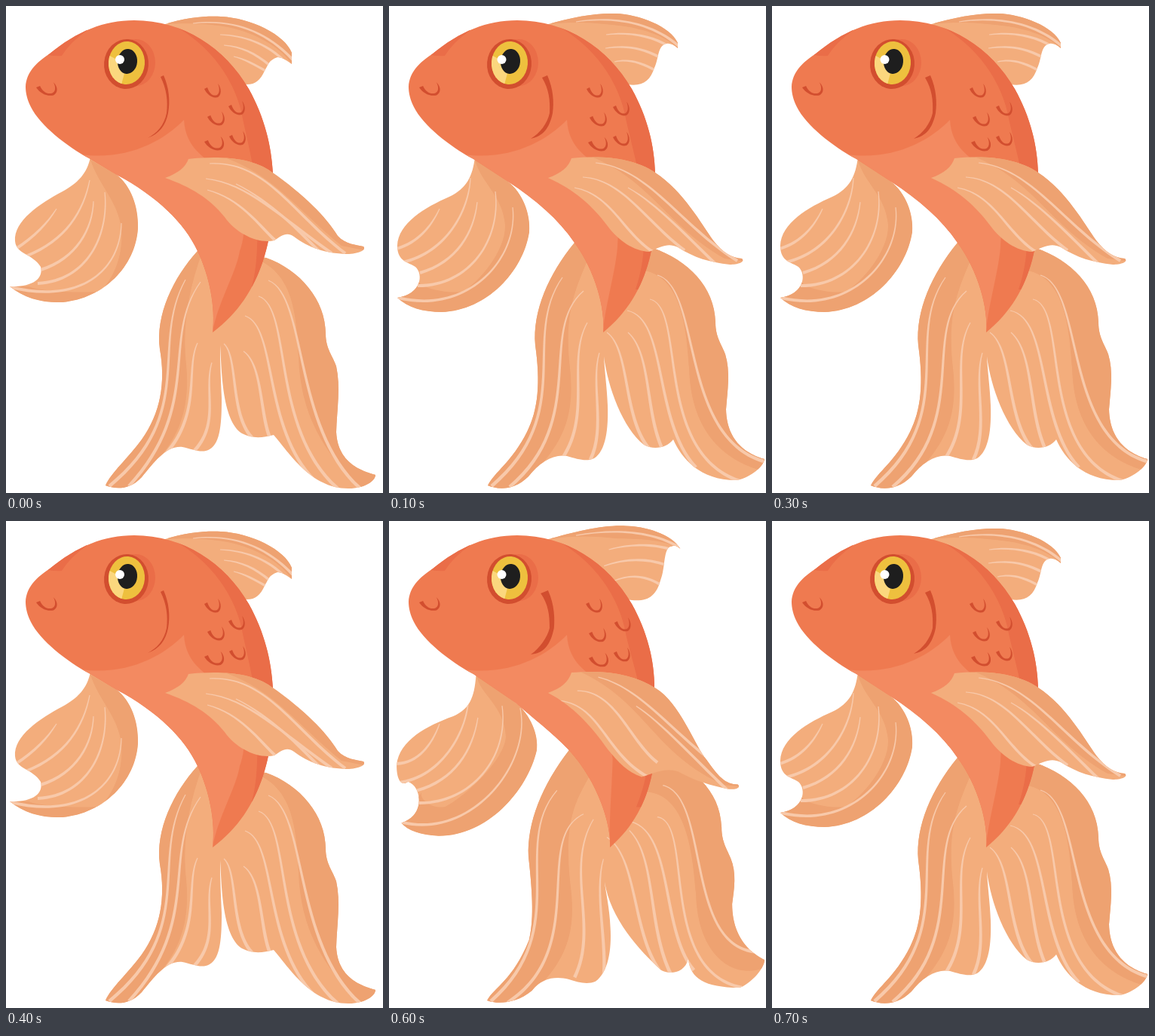
An HTML page with a canvas for the animation above (800 ms loop, 500x646 px).

```html
<!DOCTYPE html>
<html lang="en">
<head>
<meta charset="utf-8">
<title>Goldfish</title>
<style>
html, body { margin: 0; width: 100%; height: 100%; overflow: hidden; background: #fff; }
canvas { display: block; width: 500px; height: 646px; }
</style>
</head>
<body>
<canvas id="stage"></canvas>
<script>
const W = 500, H = 646, STEP = 100;
const SWAY = [0, 1, 1.9, 1]; // one stroke of the fins: rest, middle, far, middle
const FIN = '#f3ad7c', FIN_DARK = '#eea271', RAY = '#f8c9aa';
const SKIN = '#ef7a50', SKIN_DARK = '#ea6d48', BELLY = '#f38a61', RED = '#d24e2f';

// Every shape is a pair: at rest, and one step into the sway.
const dorsal = {
  edge: [
    'M208 25C240 14 270 13 285 14C325 16 370 38 379 62L379 77C372 72 366 68 360 68C348 72 348 78 343 86C337 99 330 105 317 104L260 60Z',
    'M208 25C245 14 275 9 300 10C332 11 373 27 383 49L383 56C377 51 372 49 368 50C356 52 358 70 352 82C346 100 336 107 316 104L260 60Z'],
  dark: [[
    'M215 24C250 22 272 25 288 27C325 33 362 52 379 77L390 60L380 5L210 5Z',
    'M215 24C250 20 275 23 296 25C332 28 364 38 383 56L392 40L380 5L210 5Z']],
  rays: [
    ['M248 23C300 17 345 33 380 71', 'M248 21C300 13 350 23 384 53'],
    ['M284 38C315 39 345 50 366 70', 'M288 38C318 34 350 40 370 53'],
    ['M289 52C312 54 330 62 350 79', 'M287 56C312 52 335 55 359 68'],
    ['M302 67C316 70 330 78 346 87', 'M299 74C318 70 335 75 354 86']]
};

const pelvic = {
  edge: [
    'M112 200C108 222 95 235 75 246C45 262 10 285 12 312C14 330 35 328 46 346C50 362 35 373 5 372C25 388 48 394 75 393C130 388 172 345 175 295C176 265 165 238 147 224Z',
    'M114 200C111 226 103 242 80 253C48 267 12 288 11 318C11 340 27 340 35 346C46 356 43 382 11 387C25 400 45 406 70 406C130 404 178 352 186 300C188 275 177 248 158 233Z'],
  dark: [[
    'M112 204C124 240 148 258 153 295C156 335 140 365 124 379C85 381 45 378 30 372L5 372C25 388 48 394 75 393C130 388 172 345 175 295C176 265 165 238 147 224Z',
    'M114 204C122 235 150 250 154 290C155 325 120 365 98 379C70 382 40 372 38 364L11 387C25 400 45 406 70 406C130 404 178 352 186 300C188 275 177 248 158 233Z']],
  rays: [
    ['M67 269C55 288 38 306 13 322', 'M67 269C56 293 38 314 10 322'],
    ['M111 231C103 272 80 311 26 332', 'M108 228C106 272 76 327 18 340'],
    ['M116 259C115 295 94 335 46 350', 'M117 260C113 300 90 340 41 354'],
    ['M131 247C137 305 107 365 42 368', 'M141 246C149 312 105 372 38 371'],
    ['M153 288C152 350 100 396 6 373', 'M164 267C172 335 105 410 12 387']]
};

const tail = {
  edge: [
    'M254 325C222 360 198 410 204 455C212 500 205 540 180 575C162 600 140 618 132 636C143 640 162 644 180 625C197 605 212 583 234 585C248 588 260 594 270 588C285 580 286 550 286 520C285 495 284 475 284 450C286 480 286 550 313 567C326 574 340 573 355 569C375 592 405 641 455 640C475 640 490 630 490 622C478 618 440 610 438 565C439 535 444 505 438 478C434 465 424 455 424 435C424 390 390 350 345 334Z',
    'M246 314C212 355 190 405 194 450C201 500 198 535 183 565C163 605 140 618 131 636C143 641 165 644 185 624C200 605 218 594 236 597C250 601 262 605 272 600C288 590 291 560 290 530C289 505 286 485 285 465C290 505 310 560 338 582C350 589 368 587 377 575C388 600 412 629 460 629C475 628 497 612 498 601C485 597 448 585 447 535C449 510 453 485 446 462C442 450 433 440 433 420C432 372 396 337 350 321Z'],
  dark: [
    ['M262 322C240 380 234 430 239 475C244 530 232 565 205 598L170 660L100 660L180 300Z',
     'M275 310C250 370 231 400 240 480C246 535 235 570 205 605L170 660L100 660L170 300Z'],
    ['M330 335C385 355 385 420 388 465C390 540 420 590 470 640L500 650L500 320L320 310Z',
     'M320 350C390 345 394 430 398 480C400 560 440 600 490 615L510 600L510 310L320 310Z']],
  rays: [
    ['M238 363C190 450 255 540 137 637', 'M230 360C174 440 250 540 136 637'],
    ['M258 366C205 440 262 530 163 637', 'M258 378C197 430 265 550 160 638'],
    ['M254 447C238 480 260 540 212 594', 'M263 420C235 470 270 540 230 600'],
    ['M273 473C262 510 285 555 248 592', 'M279 460C267 500 288 560 267 602'],
    ['M348 364C400 385 380 560 470 640', 'M356 357C415 375 385 570 497 604'],
    ['M335 385C380 400 350 560 440 640', 'M346 389C395 400 350 590 465 630'],
    ['M317 411C360 425 340 560 410 630', 'M316 404C370 415 350 550 407 612'],
    ['M315 458C340 475 337 540 350 572', 'M317 433C348 460 340 540 363 588'],
    ['M289 448C308 465 297 540 326 572', 'M289 433C320 455 310 545 345 587']]
};

const pectoral = {
  edge: [
    'M211 228C228 222 238 214 242 203C280 199 325 200 352 220C395 250 425 280 440 305C450 316 465 317 474 319C478 323 470 328 455 329C425 329 400 320 382 306C372 299 365 305 356 311C335 316 305 302 290 280C270 255 245 240 211 228Z',
    'M211 228C228 222 238 214 242 202C285 198 325 202 353 221C390 245 415 290 430 311C443 328 455 334 468 335C473 340 462 343 452 343C425 340 405 334 383 320C370 314 362 319 345 326C325 325 305 312 290 292C270 265 245 243 211 228Z'],
  dark: [[
    'M270 195C350 215 385 270 445 318L480 325L480 190Z',
    'M255 195C345 225 365 290 445 335L480 340L480 190Z']],
  rays: [
    ['M270 209C345 205 380 275 450 328', 'M274 208C345 215 385 290 462 338'],
    ['M265 229C320 235 365 280 432 328', 'M257 227C310 230 340 285 392 324'],
    ['M267 244C310 255 335 290 357 311', 'M246 241C295 250 310 300 350 326'],
    ['M305 236C350 258 390 300 415 325', 'M317 241C355 262 400 310 433 342']]
};

const body = [
  'M26 107C27 88 40 75 57 64C95 33 130 19 170 19C235 19 290 55 322 110C343 148 352 185 354 222C358 300 342 383 274 433C278 400 270 358 254 325C237 288 200 252 147 224L112 203C80 186 45 158 33 134C28 124 26 115 26 107Z',
  'M26 107C27 88 40 75 57 64C95 33 130 19 170 19C235 19 290 55 322 110C343 148 352 185 353 222C358 300 350 380 284 433C287 402 274 352 246 314C225 283 195 257 158 233L112 203C80 186 45 158 33 134C28 124 26 115 26 107Z'];
const belly = [
  'M100 197C160 205 208 180 236 151C238 185 258 200 290 220C320 250 320 300 310 325C305 355 280 395 274 433L150 433L60 230Z',
  'M100 197C160 205 208 180 236 151C238 185 258 200 290 220C315 245 304 290 303 320C300 355 286 400 284 433L150 433L60 230Z'];
const back = [
  'M200 15C262 40 300 90 312 140C322 190 335 230 334 290C333 330 332 350 326 372L380 372L380 15Z',
  'M200 15C262 40 300 90 312 140C322 190 338 230 339 300C338 335 334 355 327 376L380 376L380 15Z'];
const gill = [
  'M205 94L209 92C216 108 218 125 215 142C212 158 203 170 188 175C200 169 210 158 213 142C215 126 213 110 205 94Z',
  'M203 95L210 92C218 110 219 128 217 142C213 162 204 173 188 176C200 169 210 156 213 142C214 125 212 110 203 95Z'];
const brow = 'M50 64Q64 67 74 66Q85 48 108 32L60 30Z';
const crescent = new Path2D('M0 1L4-1C7 8 12 11 17 9C20 7 21 1 18-6C23 0 23 9 18 12C11 14 4 9 0 1Z');
// x, y at rest, x, y one step on, width
const scales = [
  [263, 109, 262, 109, 1], [267, 146, 266, 147, 1.05], [295, 132, 297, 133, 1],
  [263, 179, 264, 180, 1.2], [296, 172, 297, 173, 1]
];

const canvas = document.getElementById('stage');
const ctx = canvas.getContext('2d');
const dpr = window.devicePixelRatio || 1;
canvas.width = W * dpr;
canvas.height = H * dpr;

const nums = s => s.match(/-?\d+(\.\d+)?/g).map(Number);
const clamp = (v, lo, hi) => Math.min(hi, Math.max(lo, v));

// Blend a pair; k above 1 swings on, but stays inside the fish's bounds.
function blend([a, b], k) {
  const p = nums(a), q = nums(b);
  return p.map((v, i) => {
    const r = v + (q[i] - v) * k;
    if (k <= 1) return r;
    return i % 2 ? clamp(r, 4, 641) : clamp(r, 10, 498);
  });
}

function shape(pair, k) {
  const v = blend(pair, k);
  let i = 0;
  return new Path2D(pair[0].replace(/-?\d+(\.\d+)?/g, () => v[i++].toFixed(2)));
}

function fill(path, color) {
  ctx.fillStyle = color;
  ctx.fill(path);
}

// A cubic stroke that widens from its root to its end.
function ray(pair, k, width) {
  const [x0, y0, x1, y1, x2, y2, x3, y3] = blend(pair, k);
  const off = (ax, ay, bx, by, w) => {
    const d = Math.hypot(bx - ax, by - ay) || 1;
    return [(ay - by) / d * w, (bx - ax) / d * w];
  };
  const [ax, ay] = off(x0, y0, x1, y1, 0.6);
  const [bx, by] = off(x0, y0, x2, y2, width * 0.36);
  const [cx, cy] = off(x1, y1, x3, y3, width * 0.46);
  const [dx, dy] = off(x2, y2, x3, y3, width * 0.5);
  const p = new Path2D();
  p.moveTo(x0 + ax, y0 + ay);
  p.bezierCurveTo(x1 + bx, y1 + by, x2 + cx, y2 + cy, x3 + dx, y3 + dy);
  p.lineTo(x3 - dx, y3 - dy);
  p.bezierCurveTo(x2 - cx, y2 - cy, x1 - bx, y1 - by, x0 - ax, y0 - ay);
  p.closePath();
  fill(p, RAY);
}

function clipped(path, draw) {
  ctx.save();
  ctx.clip(path);
  draw();
  ctx.restore();
}

function fin(f, k, width) {
  const edge = shape(f.edge, k);
  fill(edge, FIN);
  clipped(edge, () => {
    f.dark.forEach(d => fill(shape(d, k), FIN_DARK));
    f.rays.forEach(r => ray(r, k, width));
  });
}

function oval(x, y, rx, ry, color, turn = 0) {
  const p = new Path2D();
  p.ellipse(x, y, rx, ry, turn, 0, Math.PI * 2);
  fill(p, color);
  return p;
}

function mark(x, y, sx, sy) {
  ctx.save();
  ctx.translate(x, y);
  ctx.scale(sx, sy);
  fill(crescent, RED);
  ctx.restore();
}

function eye(k) {
  oval(172, 75, 26, 31, SKIN_DARK);
  oval(159.5, 77, 29.5, 33, RED, 0.08);
  const iris = oval(160, 75.5, 24, 28.5, '#eec03e', 0.08);
  clipped(iris, () => fill(new Path2D('M130 62L160 78L152 108L130 108Z'), '#fbd77e'));
  oval(161, 73.5, 13, 16.5, '#1e1e1e', 0.08);
  oval(151 - 1.5 * Math.min(k, 1), 71, 6, 6, '#fff');
}

function draw(k) {
  ctx.setTransform(dpr, 0, 0, dpr, 0, 0);
  ctx.fillStyle = '#fff';
  ctx.fillRect(0, 0, W, H);
  fin(dorsal, k, 3.6);
  fin(pelvic, k, 4);
  fin(tail, k, 4.6);

  const skin = shape(body, k);
  fill(skin, SKIN);
  clipped(skin, () => {
    fill(shape(belly, k), BELLY);
    fill(shape(back, k), SKIN_DARK);
    fill(new Path2D(brow), SKIN_DARK);
  });
  eye(k);
  fill(shape(gill, k), RED);
  mark(40, 107, 1.27, 0.95);
  scales.forEach(([x, y, x2, y2, s]) => mark(x + (x2 - x) * k, y + (y2 - y) * k, s, 1));
  fin(pectoral, k, 4);
}

let shown = -1;
function tick() {
  const i = Math.floor(performance.now() % 800 / STEP) % SWAY.length;
  if (i !== shown) draw(SWAY[shown = i]);
  requestAnimationFrame(tick);
}
tick();
</script>
</body>
</html>
```
